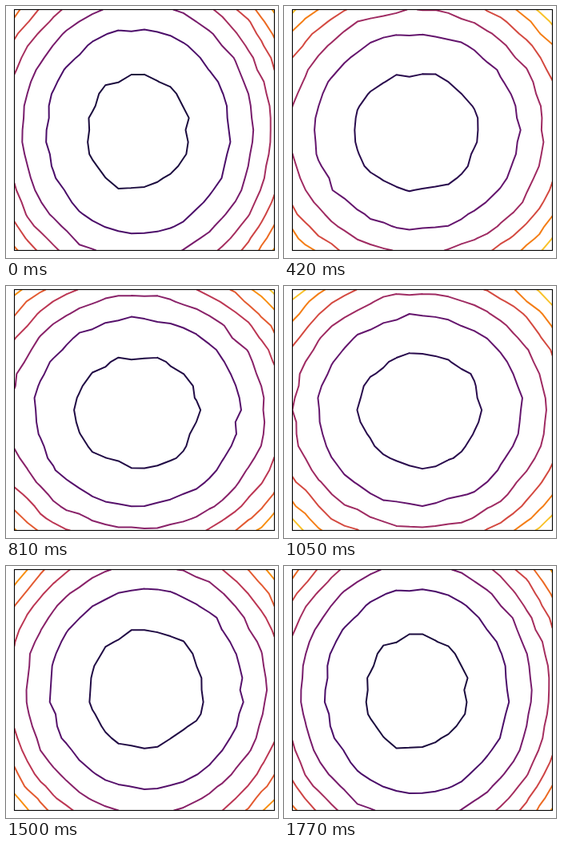
Recreate the animation shown at these times as an HTML page with a canvas. Size 340x316 px, loop 1800 ms.

```html
<!DOCTYPE html>
<html lang="en">
<head>
<meta charset="utf-8">
<title>Contour rings</title>
<style>
  html, body { margin: 0; width: 100%; height: 100%; overflow: hidden; background: #fff; }
  canvas { display: block; }
</style>
</head>
<body>
<canvas id="plot" width="340" height="316"></canvas>
<script>
const ctx = document.getElementById('plot').getContext('2d');
const LOOP = 1800, STEP = 30, N = 21;
const BOX = { x: 10.5, y: 4.5, w: 325, h: 302 };
const DX = BOX.w / (N - 1), DY = BOX.h / (N - 1);

// evenly spaced stops of the inferno colour map
const INFERNO = ['000004', '160b39', '420a68', '6a176e', '932667', 'bc3754',
  'dd513a', 'f37819', 'fca50a', 'f6d746', 'fcffa4']
  .map(c => [0, 2, 4].map(i => parseInt(c.slice(i, i + 2), 16)));

const mix = (a, b, t) => a + (b - a) * t;

function shade(v) {
  const i = Math.min(9, Math.floor(v * 10));
  const rgb = INFERNO[i].map((c, k) => Math.round(mix(c, INFERNO[i + 1][k], v * 10 - i)));
  return `rgb(${rgb})`;
}

function seeded(seed) {
  return () => {
    seed = (seed * 1664525 + 1013904223) >>> 0;
    return seed / 4294967296;
  };
}

const rand = seeded(2024);
const nodes = Array.from({ length: N * N }, (_, k) => ({
  x: BOX.x + (k % N) * DX,
  y: BOX.y + Math.floor(k / N) * DY,
  size: rand(),
  phase: rand() * 2 * Math.PI
}));

// a bowl that drifts and stretches, with every node wobbling on its own
function fieldAt(time) {
  const p = time / LOOP * 2 * Math.PI;
  const wave = (mean, cos1, sin1, cos2) =>
    mean + cos1 * Math.cos(p) + sin1 * Math.sin(p) + cos2 * Math.cos(2 * p);
  const cx = wave(168.5, 0, -6, -3.5);
  const cy = wave(156.5, 0, 2, 1);
  const ratio = wave(1.01, -0.095, 0.02, -0.022);
  const z = nodes.map(n => {
    const r = Math.hypot((n.x - cx) / ratio, n.y - cy);
    return r + 600 / (r + 30) * n.size * Math.sin(p + n.phase);
  });
  return {
    z,
    inner: wave(72.3, 0.9, -1, -1.7),
    gap: wave(1.22, 0.17, 0, 0.04),
    count: Math.round(wave(7.6, 0.6, 0, 0.75))
  };
}

// marching squares: joins the points where the level crosses each cell's edges
function traceLevel(z, level) {
  const corners = [[0, 0], [1, 0], [1, 1], [0, 1]];
  ctx.beginPath();
  for (let j = 0; j < N - 1; j++) {
    for (let i = 0; i < N - 1; i++) {
      const hits = [];
      for (let e = 0; e < 4; e++) {
        const [ax, ay] = corners[e], [bx, by] = corners[(e + 1) % 4];
        const a = z[(j + ay) * N + i + ax], b = z[(j + by) * N + i + bx];
        if ((a < level) === (b < level)) continue;
        const t = (level - a) / (b - a);
        hits.push([BOX.x + (i + mix(ax, bx, t)) * DX, BOX.y + (j + mix(ay, by, t)) * DY]);
      }
      for (let h = 0; h < hits.length; h += 2) {
        ctx.moveTo(...hits[h]);
        ctx.lineTo(...hits[h + 1]);
      }
    }
  }
  ctx.stroke();
}

function draw(time) {
  const { z, inner, gap, count } = fieldAt(time);
  const base = (inner / 100) ** 2.5;
  ctx.fillStyle = '#fff';
  ctx.fillRect(0, 0, 340, 316);
  ctx.save();
  ctx.beginPath();
  ctx.rect(BOX.x, BOX.y, BOX.w, BOX.h);
  ctx.clip();
  ctx.lineWidth = 2;
  ctx.lineCap = 'round';
  for (let k = 1; k < count; k++) {
    ctx.strokeStyle = shade(k / count);
    traceLevel(z, 100 * (base + gap * (k - 1)) ** 0.4);
  }
  ctx.restore();
  ctx.lineWidth = 1.1;
  ctx.strokeStyle = '#000';
  ctx.strokeRect(BOX.x, BOX.y, BOX.w, BOX.h);
}

const start = performance.now();
function tick() {
  const time = (performance.now() - start) % LOOP;
  draw(Math.floor(time / STEP) * STEP);
  requestAnimationFrame(tick);
}
tick();
</script>
</body>
</html>
```
